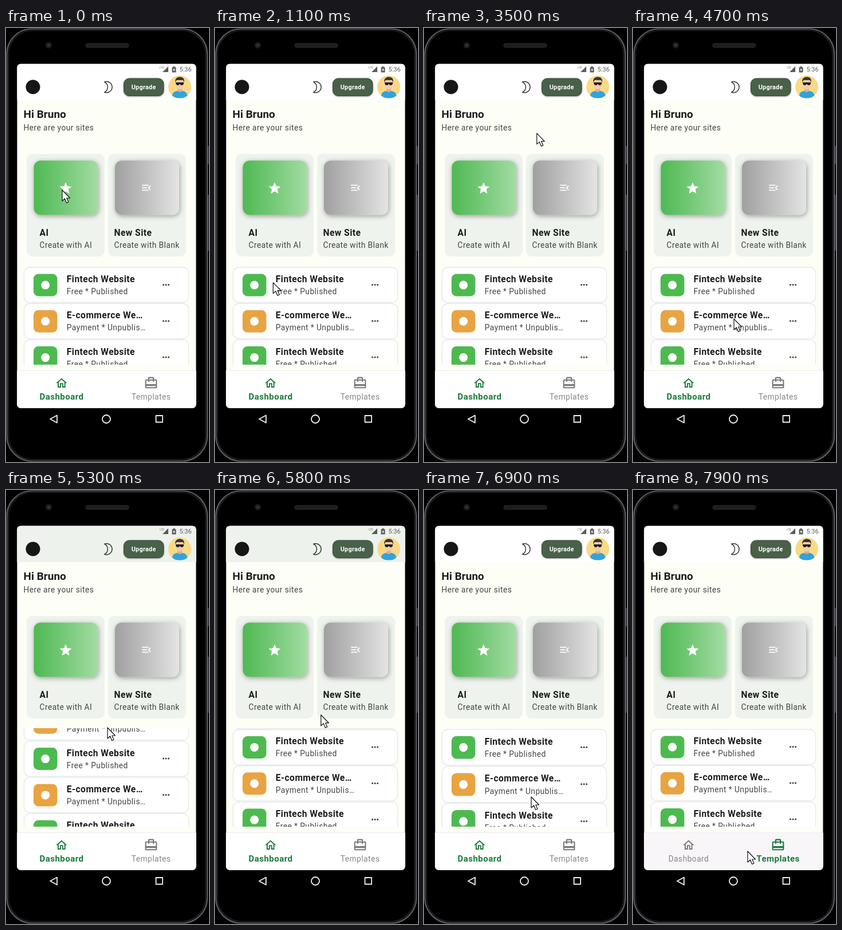
Write an HTML page that moves like this. It is 354 by 758 pixels and loops after 8000 ms.

```html
<!DOCTYPE html>
<html lang="en">
<head>
<meta charset="utf-8">
<title>Site dashboard on a phone</title>
<style>
  html, body { margin: 0; width: 100%; height: 100%; overflow: hidden; background: #000; }
  svg { display: block; width: 100%; height: 100%; }
  text { font-family: Roboto, sans-serif; fill: #1b1d1b; }
  .hello { font-size: 19px; font-weight: 600; }
  .title { font-size: 15.6px; font-weight: 600; letter-spacing: .45px; }
  .body { font-size: 13.8px; letter-spacing: .43px; fill: #434743; }
  .tab { fill: #777a77; }
  .tab text { font-size: 13.8px; letter-spacing: .43px; text-anchor: middle; fill: #858785; }
  .tab.on { fill: #1c7a3c; }
  .tab.on text { font-size: 15.1px; font-weight: 700; fill: inherit; }
</style>
</head>
<body>
<svg viewBox="0 0 354 758" preserveAspectRatio="none">
  <defs>
    <linearGradient id="green">
      <stop offset="0" stop-color="#4fb953"/><stop offset=".45" stop-color="#73c876"/><stop offset="1" stop-color="#a3dca3"/>
    </linearGradient>
    <linearGradient id="grey">
      <stop offset="0" stop-color="#a0a0a0"/><stop offset=".5" stop-color="#c1c1c1"/><stop offset="1" stop-color="#e4e4e4"/>
    </linearGradient>
    <filter id="soft" x="-20%" y="-20%" width="140%" height="150%">
      <feDropShadow dx="1" dy="2" stdDeviation="4.500" flood-color="#000" flood-opacity=".36"/>
    </filter>
    <filter id="low" x="-10%" y="-20%" width="120%" height="150%">
      <feDropShadow dx="0" dy="1" stdDeviation="1.200" flood-color="#000" flood-opacity=".4"/>
    </filter>
    <clipPath id="screen"><rect x="19.400" y="62.700" width="312" height="601" rx="6"/></clipPath>
    <clipPath id="window"><rect x="19" y="416" width="313" height="172"/></clipPath>
    <clipPath id="face"><circle cx="303" cy="103" r="20"/></clipPath>
  </defs>

  <!-- phone body -->
  <rect width="354" height="758"/>
  <path d="M352.500 206v32M352.500 291v98" stroke="#4b4d50" stroke-width="2"/>
  <rect x="1.500" y="1.500" width="349.500" height="755" rx="44" fill="#0a0a0a" stroke="#595b5e" stroke-width="2.200"/>
  <rect x="4.500" y="4.500" width="343.500" height="749" rx="41" fill="#000" stroke="#2a2b2d" stroke-width="1.200"/>
  <circle cx="74.500" cy="30" r="5.500" fill="#1b1c20"/>
  <circle cx="74.500" cy="30" r="2.500" fill="#31343f"/>
  <rect x="139" y="27" width="75" height="7" rx="3.500" fill="#1c1d1f" stroke="#2c2d2f"/>

  <g clip-path="url(#screen)">
    <rect x="19" y="62" width="313" height="602" fill="#fdfef6"/>
    <rect x="19" y="62" width="313" height="64" fill="#fff"/>
    <rect id="tint" x="19" y="62" width="313" height="64" fill="#edf2ed"/>

    <!-- status bar -->
    <g fill="#5b5d5b">
      <text x="268" y="71" font-size="5" style="fill:#777">LTE</text>
      <path d="M283 67v10h-10z"/>
      <path d="M289.500 68.500h2v-1.500h3v1.500h2v9h-7z"/>
      <path d="M293.500 70l-2.500 3.500h1.700v2.500l2.400-3.500h-1.600z" fill="#fff"/>
      <text x="302.500" y="76" font-size="11" style="fill:#5b5d5b">5:36</text>
    </g>

    <!-- app bar -->
    <circle cx="47" cy="103" r="12.500" fill="#151715"/>
    <path d="M171.700 94.200A9.700 9.700 0 1 1 171.700 112.200A10 10 0 0 0 171.700 94.200Z" fill="none" stroke="#333633" stroke-width="1.500" stroke-linejoin="round"/>
    <rect x="205.500" y="88" width="69.500" height="30.500" rx="9.500" fill="#486049" stroke="#354a36" filter="url(#low)"/>
    <text x="218.700" y="107" font-size="10.800" font-weight="700" letter-spacing=".3" style="fill:#fff">Upgrade</text>
    <g clip-path="url(#face)">
      <rect x="283" y="83" width="40" height="40" fill="#fad986"/>
      <path d="M289.500 121c0-8 4-11.500 13.500-11.500s13.500 3.500 13.500 11.500q-13.500 3-27 0z" fill="#30a4dc"/>
      <path d="M299 104h8v6q-4 4-8 0z" fill="#dfae8a"/>
      <ellipse cx="303" cy="98.500" rx="7" ry="9" fill="#f3cbaa"/>
      <path d="M295.500 95c-1.500-7 3-9.500 7.500-9.500s9 2 7.500 9.500l-2-4h-11z" fill="#3a3532"/>
      <path d="M296 95h14v2q-1 3-3.500 3t-3.500-2.500q-1 2.500-3.500 2.500t-3.500-3z" fill="#1d1e22"/>
    </g>

    <text class="hello" x="30.500" y="157">Hi Bruno</text>
    <text class="body" x="30.500" y="179">Here are your sites</text>

    <!-- create cards -->
    <g fill="#eef3ed">
      <rect x="36" y="220" width="136" height="179" rx="10"/>
      <rect x="178" y="220" width="136" height="179" rx="10"/>
    </g>
    <rect x="48.500" y="231.500" width="112" height="95" rx="12" fill="url(#green)" filter="url(#soft)"/>
    <rect x="190" y="231.500" width="112" height="95" rx="12" fill="url(#grey)" filter="url(#soft)"/>
    <g fill="#fff">
      <path transform="translate(91.500 267.300) scale(1.040)" d="M12 17.270L18.180 21l-1.640-7.030L22 9.240l-7.190-.61L12 2 9.190 8.630 2 9.240l5.460 4.730L5.820 21z"/>
      <path transform="translate(234.600 268.600) scale(.87)" d="M3 18h13v-2H3zM3 6v2h13V6zM3 13h10v-2H3zM21 15.590L17.420 12 21 8.410 19.590 7l-5 5 5 5z"/>
    </g>
    <text class="title" x="58.500" y="363">AI</text>
    <text class="body" x="58.500" y="384">Create with AI</text>
    <text class="title" x="188.500" y="363">New Site</text>
    <text class="body" x="188.500" y="384">Create with Blank</text>

    <g clip-path="url(#window)"><g id="list"></g></g>

    <!-- bottom tabs -->
    <rect x="19" y="598" width="313" height="66" fill="#eceeea"/>
    <rect id="bar" x="19" y="599" width="313" height="65"/>
    <g id="home" class="tab">
      <path transform="translate(85.200 608.500) scale(.97)" d="M12 5.690l5 4.500V18h-2v-6H9v6H7v-7.810l5-4.500M12 3L2 12h3v8h6v-6h2v6h6v-8h3L12 3z"/>
      <text x="97" y="649">Dashboard</text>
    </g>
    <g id="templates" class="tab">
      <path transform="translate(240.500 607.500) scale(1.040)" d="M20 6h-3V4c0-1.110-.89-2-2-2H9c-1.110 0-2 .89-2 2v2H4c-1.110 0-2 .89-2 2v11c0 1.110.89 2 2 2h16c1.110 0 2-.89 2-2V8c0-1.110-.89-2-2-2zM9 4h6v2H9V4zm11 15H4v-2h16v2zm0-5H4V8h3v2h2V8h6v2h2V8h3v6z"/>
      <text x="253" y="649">Templates</text>
    </g>
  </g>

  <!-- system buttons -->
  <g fill="none" stroke="#f2f2f2" stroke-width="1.800" stroke-linejoin="round">
    <path d="M89 676.500v13L77 683z"/>
    <circle cx="175" cy="683" r="7"/>
    <rect x="261.500" y="677" width="11.500" height="11.500"/>
  </g>

  <path id="cursor" d="M0 0V19L4.500 15 7.700 22.500 11 21 7.800 14H13.500Z" fill="#fff" stroke="#111" stroke-width="1.200" stroke-linejoin="round"/>
</svg>
<script>
  const LOOP = 8000, STEP = 100, LIST_TOP = 416;
  const byId = id => document.getElementById(id);

  // Each row: time, value(s)
  const cursorPath = [
    [0, 98, 283], [200, 98, 283], [600, 97, 375], [1000, 94, 458], [1500, 165, 330],
    [1700, 165, 330], [2300, 209, 224], [2500, 212, 224], [2900, 226, 185], [3400, 201, 160],
    [3900, 160, 390], [4300, 172, 505], [4700, 176, 508], [4800, 176, 508], [5300, 177, 415],
    [5700, 184, 392], [6000, 187, 395], [6300, 187, 418], [6900, 187, 536], [7100, 187, 538],
    [7400, 234, 640], [7600, 236, 642], [7900, 200, 631]
  ];
  const scrollPath = [[0, 0], [4800, 0], [5300, 106], [5700, 130], [6000, 115], [6300, 67], [6650, 0]];
  const stretchPath = [[0, 1], [6650, 1], [6900, 1.021], [7100, 1.021], [7300, 1]];
  const tintPath = [[0, 0], [4800, 0], [5000, 1], [6600, 1], [6800, 0]];
  const tabSwitch = 7600;

  function sample(path, t) {
    const next = path.findIndex(row => row[0] > t);
    if (next < 0) return path[path.length - 1].slice(1);
    const a = path[next - 1], b = path[next];
    const p = (t - a[0]) / (b[0] - a[0]);
    const ease = p * p * (3 - 2 * p);
    return a.slice(1).map((v, i) => v + (b[i + 1] - v) * ease);
  }

  function siteCard(i) {
    const [title, status, color] = i % 2
      ? ['E-commerce We…', 'Payment * Unpublis…', '#e8a443']
      : ['Fintech Website', 'Free * Published', '#4dba50'];
    const dots = [274.5, 279, 283.5].map(x => `<circle cx="${x}" cy="30.500" r="1.500" fill="#3b3e3b"/>`).join('');
    return `<g transform="translate(0 ${418 + 63.3 * i})">
      <rect x="31.500" y="0" width="287" height="61.500" rx="10" fill="#fff" stroke="#e6eae8" stroke-width="1.400"/>
      <rect x="48" y="11.500" width="41.500" height="39" rx="8.500" fill="${color}"/>
      <circle cx="68.700" cy="31" r="7.500" fill="#fff"/>
      <text class="title" x="105.800" y="26">${title}</text>
      <text class="body" x="105.800" y="47">${status}</text>${dots}</g>`;
  }

  byId('list').innerHTML = Array.from({ length: 8 }, (_, i) => siteCard(i)).join('');

  function draw(t) {
    const [x, y] = sample(cursorPath, t);
    const [scroll] = sample(scrollPath, t);
    const [stretch] = sample(stretchPath, t);
    const switched = t >= tabSwitch;
    byId('cursor').setAttribute('transform', `translate(${x} ${y})`);
    byId('list').setAttribute('transform',
      `translate(0 ${LIST_TOP - scroll}) scale(1 ${stretch}) translate(0 ${-LIST_TOP})`);
    byId('tint').setAttribute('opacity', sample(tintPath, t)[0]);
    byId('bar').setAttribute('fill', switched ? '#f9f6fa' : '#fff');
    byId('home').classList.toggle('on', !switched);
    byId('templates').classList.toggle('on', switched);
  }

  function tick() {
    const t = performance.now() % LOOP;
    draw(Math.floor(t / STEP) * STEP);
    requestAnimationFrame(tick);
  }
  tick();
</script>
</body>
</html>
```
